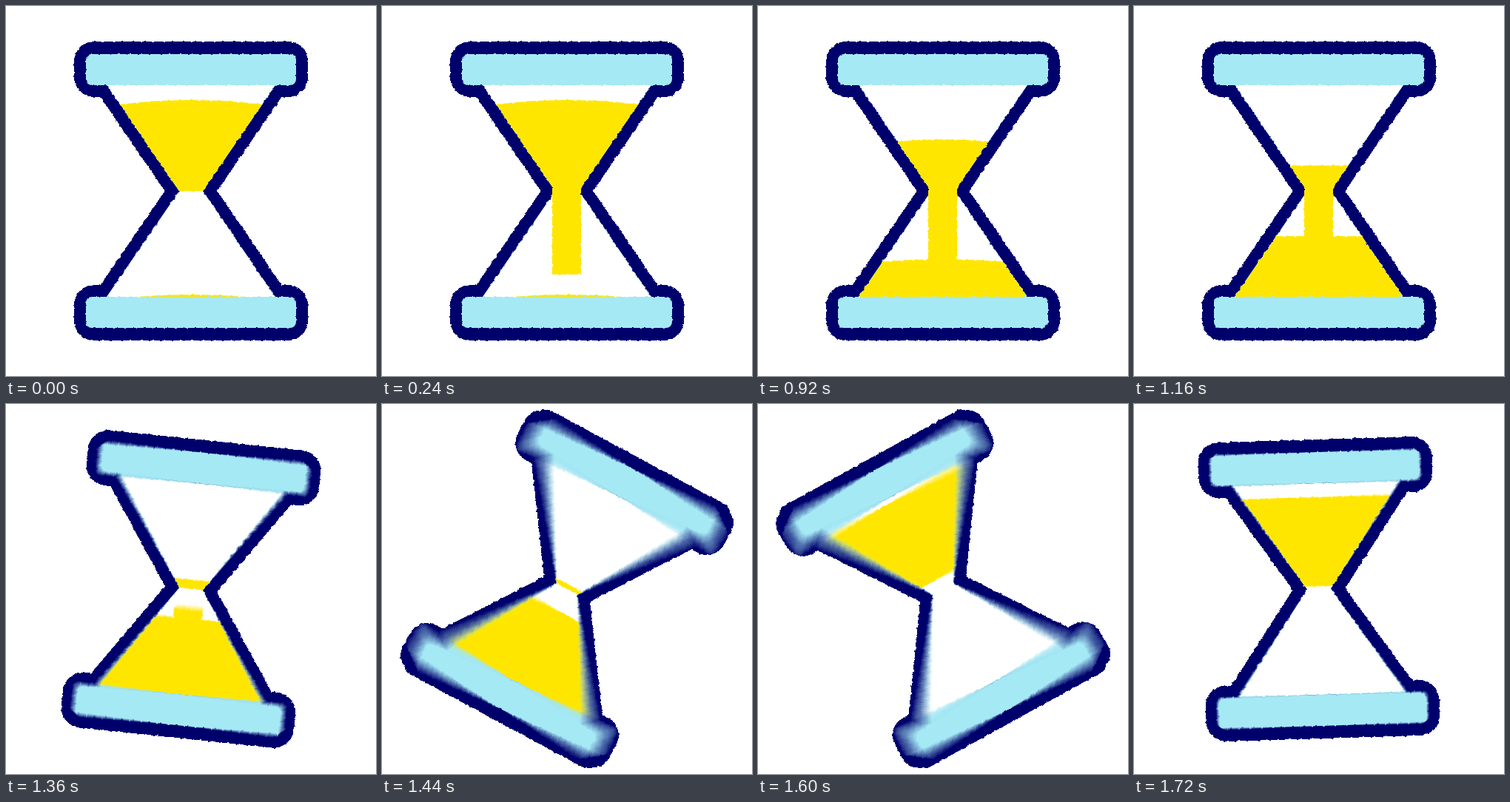
Recreate the animation shown at these times as an HTML page with a canvas. Size 500 by 500 pixels, loop 1760 ms.

```html
<!DOCTYPE html>
<html lang="en">
<head>
<meta charset="utf-8">
<title>Hourglass</title>
<style>
  html, body { margin: 0; width: 100%; height: 100%; overflow: hidden; background: #fff; }
  canvas { display: block; width: 100vw; height: 100vh; }
</style>
</head>
<body>
<canvas id="stage" width="500" height="500"></canvas>
<script>
const SIZE = 500, MID = 250, LOOP = 1760, STEP = 40, SHUTTER = 20;
const NAVY = [0, 0, 108], BLUE = [165, 233, 245], SAND = [255, 230, 0], WHITE = [255, 255, 255];
const FLIP = { start: 1269, length: 503, ease: 0.65 };

// Layers are drawn as coverage: red = inside the outline, green = bulb contents, blue = sand.
const LAYER = { outline: '#000', inside: '#f00', empty: '#ff0', sand: '#fff' };

const view = document.getElementById('stage').getContext('2d');
const scratch = document.createElement('canvas');
scratch.width = scratch.height = SIZE;
const ctx = scratch.getContext('2d', { willReadFrequently: true });

const clamp = (v, lo = 0, hi = 1) => Math.min(hi, Math.max(lo, v));
const ramp = (t, from, to) => clamp((t - from) / (to - from));
const smooth = p => p * p * (3 - 2 * p);
const mix = (a, b, p) => a + (b - a) * p;

// Symmetric bezier ease with handles (a, 0) and (1 - a, 1).
function bezierEase(x, a) {
  let lo = 0, hi = 1;
  for (let i = 0; i < 30; i++) {
    const s = (lo + hi) / 2, r = 1 - s;
    const bx = 3 * a * s * r * r + 3 * (1 - a) * s * s * r + s * s * s;
    if (bx < x) lo = s; else hi = s;
  }
  return smooth((lo + hi) / 2);
}

// Smooth curve through [time, value] knots.
function through(t, knots) {
  const last = knots.length - 1;
  if (t <= knots[0][0]) return knots[0][1];
  if (t >= knots[last][0]) return knots[last][1];
  let i = 0;
  while (t > knots[i + 1][0]) i++;
  const slope = k => {
    if (k === 0) return 0;
    const a = knots[k - 1], b = knots[Math.min(k + 1, last)];
    return (b[1] - a[1]) / (b[0] - a[0]);
  };
  const [t0, v0] = knots[i], [t1, v1] = knots[i + 1];
  const d = t1 - t0, p = (t - t0) / d;
  return mix(v0, v1, smooth(p))
    + d * p * (1 - p) * ((1 - p) * slope(i) - p * slope(i + 1));
}

const PILE = [[340, 397], [680, 377], [1160, 311], [1360, 290], [1520, 273], [1760, 250]];

function pose(t) {
  const turn = bezierEase(ramp(t, FLIP.start, FLIP.start + FLIP.length), FLIP.ease);
  return {
    angle: turn * Math.PI,
    dome: ramp(t, 1160, 680),
    top: 133 + 117 * smooth(ramp(t, 340, 1620)),
    pile: through(t, PILE),
    base: 393 - 20 * smooth(ramp(t, 1500, 1760)),
    streamTop: t < 1303 ? 244 : 250 + 0.45 * (t - 1303),
    streamEnd: Math.min(393, 250 + 0.47 * t)
  };
}

function path(points) {
  ctx.beginPath();
  points.forEach(([x, y]) => ctx.lineTo(x, y));
  ctx.closePath();
}

function roundBox(x, y, w, h, r, color) {
  ctx.fillStyle = color;
  ctx.beginPath();
  ctx.roundRect(x, y, w, h, r);
  ctx.fill();
}

const UPPER = [[136, 107], [364, 107], [266, 250], [234, 250]];
const LOWER = [[234, 250], [266, 250], [364, 393], [136, 393]];
const GLASS = [[136, 107], [364, 107], [266, 250], [364, 393], [136, 393], [234, 250]];

// Sand inside one bulb: domed surface at `level`, flat bottom at `floor`.
function sand(bulb, level, dome, floor) {
  const half = Math.min(114, 16 + 98 * Math.abs(level - MID) / 143) + 1;
  const bottom = Math.max(level, floor);
  ctx.save();
  path(bulb);
  ctx.clip();
  ctx.fillStyle = LAYER.sand;
  ctx.beginPath();
  ctx.moveTo(MID - half, level);
  ctx.quadraticCurveTo(MID, level - 2 * dome, MID + half, level);
  ctx.lineTo(MID + 120, bottom);
  ctx.lineTo(MID - 120, bottom);
  ctx.fill();
  ctx.restore();
}

function drawHourglass(t) {
  const p = pose(t);
  ctx.setTransform(1, 0, 0, 1, 0, 0);
  ctx.clearRect(0, 0, SIZE, SIZE);
  ctx.translate(MID, MID);
  ctx.rotate(p.angle);
  ctx.translate(-MID, -MID);

  roundBox(92, 48, 316, 75, 27, LAYER.outline);
  roundBox(92, 377, 316, 75, 27, LAYER.outline);
  path(GLASS);
  ctx.lineWidth = 32;
  ctx.strokeStyle = LAYER.outline;
  ctx.stroke();
  ctx.fillStyle = LAYER.empty;
  ctx.fill();
  roundBox(108, 65, 284, 42, 8, LAYER.inside);
  roundBox(108, 393, 284, 42, 8, LAYER.inside);

  sand(UPPER, p.top, 6 * p.dome, 250);
  sand(LOWER, p.pile, 7 * p.dome, p.base);
  if (t > 0 && p.streamTop < p.pile) {
    ctx.fillStyle = LAYER.sand;
    ctx.fillRect(230, p.streamTop, 39, p.streamEnd - p.streamTop);
  }
}

// Small ragged offset that gives the edges their rough cut.
function wobble(u, v, seed) {
  return Math.round(0.35 * (Math.sin(u * 0.83 + v * 0.21 + seed * 5)
    + Math.sin(u * 0.37 - v * 0.29 + seed * 3 + 2)));
}

// Sums the coverage of all shutter samples.
function expose(t, count) {
  const sum = new Float32Array(SIZE * SIZE * 4);
  for (let k = 0; k < count; k++) {
    drawHourglass(Math.min(LOOP, t + SHUTTER * ((k + 0.5) / count - 0.5)));
    const px = ctx.getImageData(0, 0, SIZE, SIZE).data;
    for (let i = 0; i < px.length; i += 4) {
      const a = px[i + 3];
      if (!a) continue;
      for (let c = 0; c < 3; c++) sum[i + c] += px[i + c] * a / 255;
      sum[i + 3] += a;
    }
  }
  return sum;
}

// Colours every pixel that is covered at least half of the time.
function render(step) {
  const t = step * STEP;
  const count = t < FLIP.start ? 1 : 16;
  const sum = expose(t, count);
  const out = new ImageData(SIZE, SIZE);
  out.data.fill(255);
  const seed = Math.floor(step / 11);
  for (let y = 2; y < SIZE - 2; y++) {
    for (let x = 2; x < SIZE - 2; x++) {
      const from = ((y + wobble(x, y, seed)) * SIZE + x + wobble(y, x, seed + 1)) * 4;
      const a = sum[from + 3];
      if (a < 127 * count) continue;
      const inside = sum[from] / a, filled = sum[from + 1] / a;
      const grain = filled ? sum[from + 2] / sum[from + 1] : 0;
      const to = (y * SIZE + x) * 4;
      for (let c = 0; c < 3; c++) {
        const back = mix(NAVY[c], BLUE[c], inside);
        out.data[to + c] = mix(back, mix(WHITE[c], SAND[c], grain), filled ** 3);
      }
    }
  }
  return out;
}

const cache = [];
let shown = -1;
const begin = performance.now();

function tick() {
  const step = Math.floor(((performance.now() - begin) % LOOP) / STEP);
  if (step !== shown) {
    cache[step] = cache[step] || render(step);
    view.putImageData(cache[step], 0, 0);
    shown = step;
  }
  requestAnimationFrame(tick);
}
tick();
</script>
</body>
</html>
```
